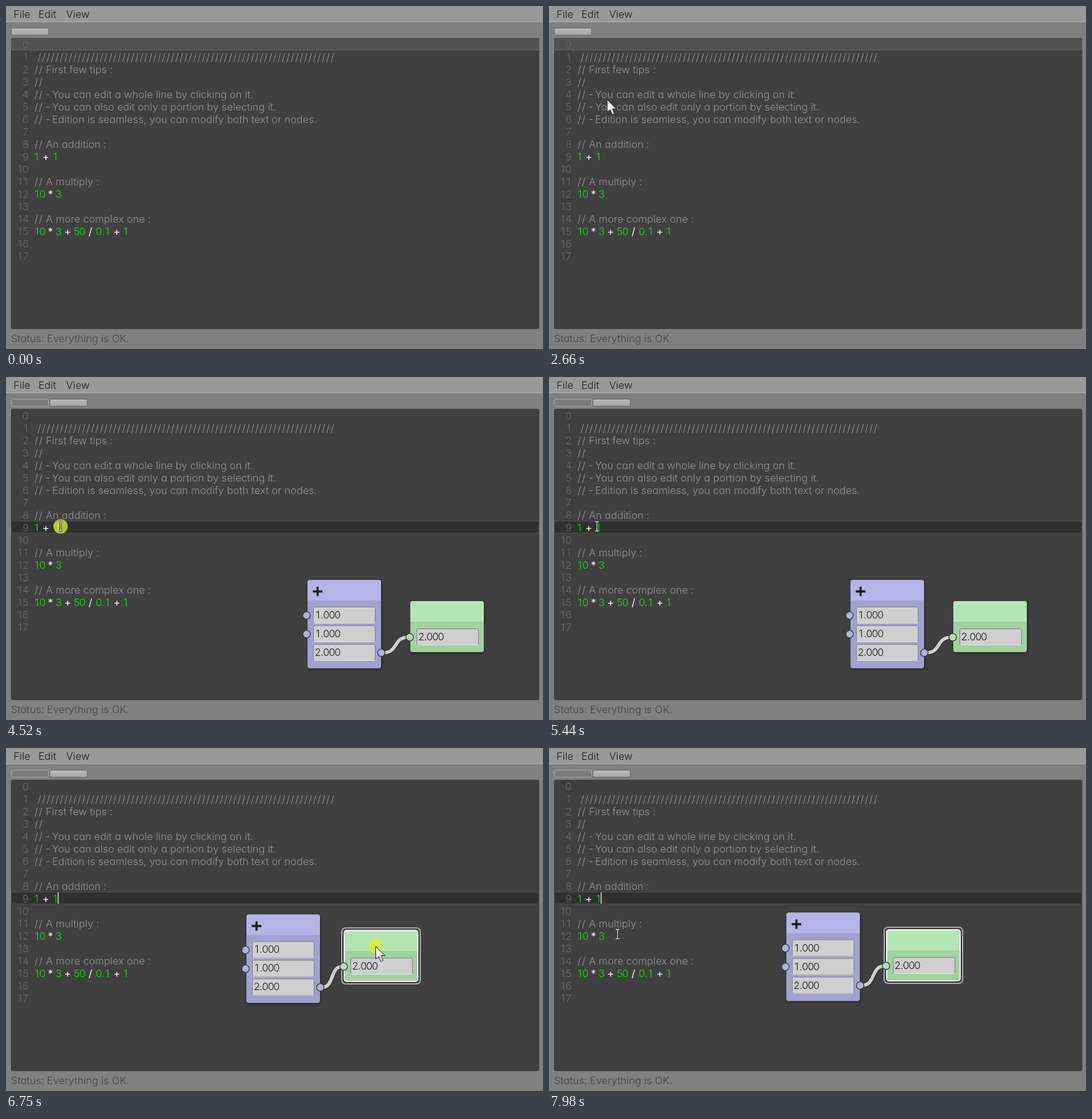
Write an HTML page that moves like this. It is 862 px wide and 551 px high and loops after 8 s.

```html
<!DOCTYPE html>
<html lang="en">
<head>
<meta charset="utf-8">
<title>Node editor</title>
<style>
  html, body { margin: 0; width: 100%; height: 100%; overflow: hidden; background: #808080; }
  svg { display: block; width: 862px; height: 551px; }
  text {
    font: 300 16.4px Inter, Lato, sans-serif;
    font-feature-settings: "cv11";
    letter-spacing: .08px;
    white-space: pre;
  }
  .node { filter: drop-shadow(1px 2px 2px rgba(0, 0, 0, .45)); }
</style>
</head>
<body>
<svg id="stage" viewBox="0 0 862 551" xmlns="http://www.w3.org/2000/svg">
  <defs>
    <linearGradient id="tabFill" x2="0" y2="1">
      <stop stop-color="#b8b8b8"/><stop offset="1" stop-color="#a6a6a6"/>
    </linearGradient>
  </defs>
</svg>
<script>
const stage = document.getElementById('stage');
const LOOP = 8000, FRAME = 1000 / 13, START = 505;
const CLICK = 4360, GRAB = 6040, DROP = 6860;

function add(parent, tag, attrs, content) {
  const el = document.createElementNS(stage.namespaceURI, tag);
  for (const key in attrs) el.setAttribute(key, attrs[key]);
  if (content !== undefined) el.textContent = content;
  parent.append(el);
  return el;
}
const group = (parent, attrs) => add(parent, 'g', attrs);
const rect = (parent, x, y, width, height, fill, more) =>
  add(parent, 'rect', { x, y, width, height, fill, ...more });
const label = (parent, x, y, fill, content, more) =>
  add(parent, 'text', { x, y, fill, ...more }, content);
const show = (el, on) => el.setAttribute('visibility', on ? 'visible' : 'hidden');
const move = (el, [x, y]) => el.setAttribute('transform', `translate(${x} ${y})`);

// Evenly pitched digits and slashes, each centred in its cell.
function cells(parent, x, y, fill, content) {
  const xs = [...content].map(c => {
    const advance = c === '.' ? 4.5 : c === '/' ? 7.13 : 9.1;
    x += advance;
    return (x - advance / 2).toFixed(2);
  });
  label(parent, xs.join(' '), y, fill, content, { 'text-anchor': 'middle' });
}

// Window
rect(stage, 0, 0, 862, 25, '#999');
rect(stage, 0, 25, 862, 1, '#b0b0b0');
[['File', 12], ['Edit', 52], ['View', 96.5]].forEach(([name, x]) => label(stage, x, 19, '#1c1c1c', name));
const tab = x => rect(stage, x, 35.5, 60, 11.5, 'url(#tabFill)', { rx: 2.5, stroke: '#626262' });
const tabs = [tab(8.5), tab(70.5)];
rect(stage, 8, 51, 848, 468, '#404040', { rx: 3 });
const idleRow = group(stage);
rect(idleRow, 8.5, 51.5, 847, 19, '#505050', { rx: 2, stroke: '#5c5c5c' });
rect(idleRow, 9, 70, 846, 1, '#686868');
const activeRow = rect(stage, 8.5, 231.5, 847, 19, '#303030', { stroke: '#4b4b4b' });
label(stage, 8, 540, '#444', 'Status: Everything is OK.');

// Code
const comments = {
  2: 'First few tips :', 3: '',
  4: '- You can edit a whole line by clicking on it.',
  5: '- You can also edit only a portion by selecting it.',
  6: '- Edition is seamless, you can modify both text or nodes.',
  8: 'An addition :', 11: 'A multiply :', 14: 'A more complex one :'
};
const formulas = {
  9: [['1', 49], ['+', 64], ['1', 79]],
  12: [['10', 54], ['*', 71.5], ['3', 84.5]],
  15: [['10', 54], ['*', 71.5], ['3', 84.5], ['+', 99], ['50', 118], ['/', 135.5],
       ['0.1', 156], ['+', 178], ['1', 192]]
};
const baseline = row => 68 + 20 * row;
const GREY = '#949494';

for (let row = 0; row < 18; row++) {
  const number = String(row);
  cells(stage, 36 - 9.1 * number.length, baseline(row), '#696969', number);
}
cells(stage, 50, baseline(1), GREY, '/'.repeat(67));
for (const row in comments) {
  const y = baseline(row), bullet = comments[row].startsWith('- ');
  cells(stage, 45, y, GREY, '//');
  if (bullet) label(stage, 63.5, y, GREY, '-');
  label(stage, bullet ? 74 : 64, y, GREY, bullet ? comments[row].slice(2) : comments[row]);
}
for (const row in formulas) {
  for (const [token, center] of formulas[row]) {
    if (/\d/.test(token)) {
      const width = token.includes('.') ? 22.7 : 9.1 * token.length;
      cells(stage, center - width / 2, baseline(row), '#00f000', token);
    } else {
      label(stage, center, baseline(row), '#fff', token, { 'text-anchor': 'middle', style: 'font-weight:400' });
    }
  }
}
const caret = rect(stage, 83, 232, 1.3, 18, '#f0f0f0');

// Nodes
const graph = group(stage);

function makeNode(height, light, dark, fields) {
  const node = group(graph);
  const box = group(node, { class: 'node' });
  rect(box, 0, 0, 118, height, dark, { rx: 4 });
  add(box, 'path', { d: 'M0 33V4Q0 0 4 0H114Q118 0 118 4V33Z', fill: light });
  for (const [x, y, value] of fields) {
    rect(node, x + .5, y + .5, 99, 26, '#cfcfcf', { rx: 2, stroke: '#808080' });
    rect(node, x + 1, y + 26, 98, 1, '#e2e2e2');
    cells(node, x + 3, y + 19, '#1c1c1c', value);
  }
  return node;
}
const pin = (parent, cx, cy, fill) =>
  add(parent, 'circle', { cx, cy, r: 6, fill, stroke: '#30303a', 'stroke-width': 1.2 });

const sum = makeNode(142, '#b4b4e6', '#a2a2d1', [[9, 43, '1.000'], [9, 73, '1.000'], [9, 103, '2.000']]);
add(sum, 'path', { d: 'M8.5 18.5H24M16.2 11V26', stroke: '#1a1a1a', 'stroke-width': 3.4 });
const result = makeNode(82, '#b4e6b4', '#a2d1a2', [[10, 44, '2.000']]);
const selection = group(result, { fill: 'none' });
rect(selection, 0, 0, 118, 82, 'none', { rx: 4, stroke: '#f4f4f4', 'stroke-width': 2 });
const halo = rect(selection, -4, -4, 126, 90, 'none', { rx: 6, 'stroke-width': 2 });
const wires = [['#262626', 7.5], ['#cfcfcf', 5.5]].map(([stroke, width]) =>
  add(graph, 'path', { fill: 'none', stroke, 'stroke-width': width }));
const sumPins = group(graph), resultPin = group(graph);
[[-1.5, 57], [-1.5, 87], [118.5, 117]].forEach(([x, y]) => pin(sumPins, x, y, '#b0b0e2'));
pin(resultPin, -1, 58, '#b0e2b0');

// Pointers
const press = add(stage, 'circle', { r: 11.5, fill: '#e0f02a', opacity: .75 });
const arrow = add(stage, 'path', {
  d: 'M.5 .5V21L5.2 16.8 8.8 25 12.4 23.4 8.9 15.6H15.4Z', fill: '#f4f4f4', stroke: '#202020'
});
const beam = group(stage, { fill: 'none' });
[['#181818', 3], ['#e8e8e8', 1.3]].forEach(([stroke, width]) => add(beam, 'path', {
  d: 'M-3 -7.5H-1Q0 -7.5 0 -6.5Q0 -7.5 1 -7.5H3M0 -6.5V6.5M-3 7.5H-1Q0 7.5 0 6.5Q0 7.5 1 7.5H3',
  stroke, 'stroke-width': width
}));

// Motion keys: time, x, y
const pointerPath = [
  [505, 727, 476], [1275, 147, 213], [1700, 128, 264], [2125, 107, 174], [2510, 93, 150],
  [2655, 93, 150], [2970, 76, 120], [3430, 85, 233], [3590, 85, 236], [3735, 78, 225],
  [3888, 90, 237], [4190, 90, 237], [4220, 91, 237], [4360, 90, 240], [5130, 77, 240],
  [5435, 77, 240], [5890, 741, 420], [6045, 690, 377], [6200, 688, 376],
  [6351, 677, 369], [6735, 593, 318], [6890, 591, 317], [7660, 112, 300], [7740, 110, 299]
];
const resultPath = [[6200, 649, 360], [6351, 637, 353], [6735, 543, 293], [6890, 542, 292]];
const sumPath = [[6351, 484, 326], [6735, 386, 267.5], [7050, 381, 264.5]];

function along(keys, t) {
  const next = keys.findIndex(key => key[0] > t);
  if (next === 0) return keys[0].slice(1);
  if (next < 0) return keys[keys.length - 1].slice(1);
  const [t0, x0, y0] = keys[next - 1], [t1, x1, y1] = keys[next];
  let k = (t - t0) / (t1 - t0);
  if (Math.hypot(x1 - x0, y1 - y0) > 150) k = k * k * (3 - 2 * k);
  return [x0 + (x1 - x0) * k, y0 + (y1 - y0) * k];
}

function draw(time) {
  const t = START + Math.floor((time - START) / FRAME) * FRAME;
  const editing = t >= CLICK, selected = t >= GRAB;

  show(idleRow, !editing);
  show(activeRow, editing);
  show(tabs[1], editing);
  tabs[0].setAttribute('fill', editing ? '#7c7c7c' : 'url(#tabFill)');
  tabs[0].setAttribute('stroke', editing ? '#a8a8a8' : '#626262');
  show(caret, editing && (t - 4250) % 1200 < 800);

  graph.style.display = t >= CLICK + 70 ? '' : 'none';
  const a = along(sumPath, t), b = along(resultPath, t);
  move(sum, a); move(sumPins, a);
  move(result, b); move(resultPin, b);
  const [x0, y0, x1, y1] = [a[0] + 121, a[1] + 117, b[0] - 3, b[1] + 58];
  const bend = (x1 - x0) * .62;
  for (const wire of wires) {
    wire.setAttribute('d', `M${x0} ${y0}C${x0 + bend} ${y0} ${x1 - bend} ${y1} ${x1} ${y1}`);
  }
  selection.style.display = selected ? '' : 'none';
  const glow = Math.round(115 + 55 * Math.min(1, Math.max(0, (t - 6351) / 384)));
  halo.setAttribute('stroke', `rgb(${glow},${glow},${glow})`);

  const p = along(pointerPath, t);
  const typing = editing && p[0] < 535;
  [press, arrow, beam].forEach(el => move(el, p));
  show(arrow, t >= START - 1 && !typing);
  show(beam, typing);
  show(press, (editing && t < CLICK + 150) || (selected && t < DROP));
}

function tick() {
  draw(performance.now() % LOOP);
  requestAnimationFrame(tick);
}
tick();
</script>
</body>
</html>
```
